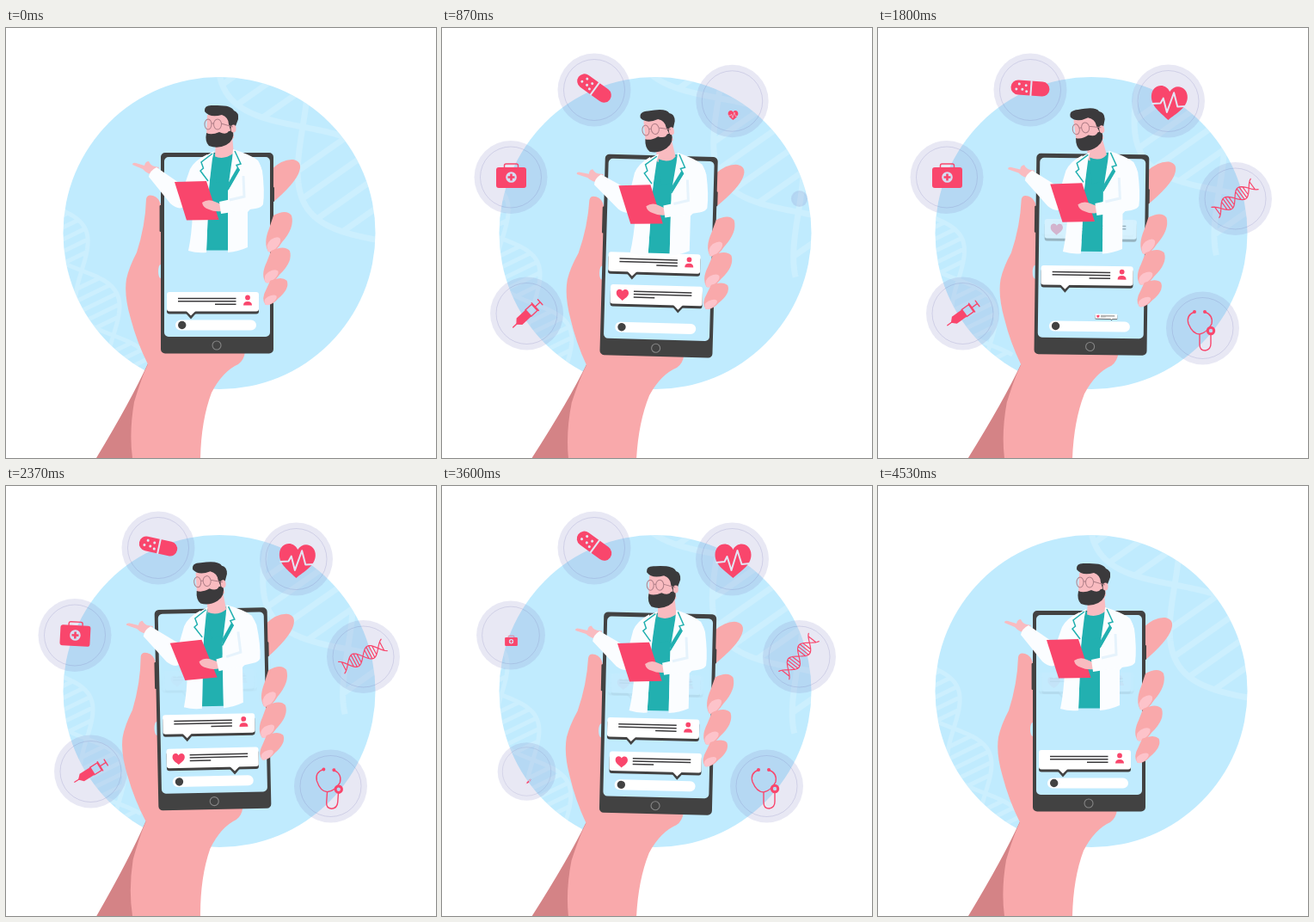
Recreate the animation shown at these times as an HTML page. Size 500 px wide and 500 px high, loop 4.56 s.

```html
<!DOCTYPE html>
<html lang="en">
<head>
<meta charset="utf-8">
<title>Online doctor</title>
<style>
  html, body { margin: 0; width: 100%; height: 100%; overflow: hidden; background: #fff; }
  svg { display: block; width: 100%; height: 100%; }
  .skin { fill: #f9a9ab; } .nail { fill: #fdc3ca; } .face { fill: #f9bbc0; }
  .dark { fill: #424242; } .hair { fill: #3b3a3c; } .pink { fill: #f9466c; }
  .coat { fill: #fbfdff; } .teal { fill: #22b0b0; } .sky { fill: #c0ebfe; }
  .line { fill: none; stroke: #f9466c; stroke-width: 1.4; stroke-linecap: round; }
  .pale { fill: none; stroke: #e3e6f5; stroke-width: 2; }
  .lapel { fill: none; stroke: #22b0b0; stroke-width: 1.5; }
  .helix { fill: none; stroke: #fff; opacity: .18; }
</style>
</head>
<body>
<svg viewBox="0 0 500 500">
  <defs>
    <clipPath id="disc"><circle cx="248" cy="238.5" r="181.5"/></clipPath>
    <path id="heart" d="M0 20C-9 12-21 5-21-7C-21-20-6-24 0-13C6-24 21-20 21-7C21 5 9 12 0 20Z"/>
    <g id="finger">
      <path class="skin" d="M9 4Q24-4 30 4Q34 18 19 35Q11 48 3 46Q-3 36 4 19Z"/>
      <path class="nail" d="M3 46Q-1 38 6 32Q14 27 17 31Q18 36 12 42Q7 48 3 46Z"/>
    </g>
  </defs>

  <circle class="sky" cx="248" cy="238.5" r="181.5"/>
  <g clip-path="url(#disc)">
    <g transform="translate(345 115) rotate(55)"><path class="helix" id="helixR" stroke-width="7"/></g>
    <g transform="translate(88 282) rotate(64)"><path class="helix" id="helixL" stroke-width="5"/></g>
  </g>
  <g id="badges"></g>

  <g id="sway">
    <path fill="#d48386" d="M165 390Q146 432 105 500L100 512H150V500L172 420Z"/>
    <path class="skin" d="M163 199Q164 193 171 195Q178 197 180 206L184 360L278 376Q277 386 270 391Q252 399 239 424Q227 456 226 500V512H148L147 500Q143 470 149 435Q158 405 165 391Q152 365 145 338Q137 311 140 292Q143 278 152 261Q162 230 163 199Z"/>
    <path class="skin" d="M309 164Q322 152 334 153Q345 155 341 167Q337 180 309 204Z"/>
    <ellipse class="sky" cx="180" cy="283" rx="3" ry="8"/>
    <rect class="dark" x="178.6" y="206" width="4" height="31" rx="1"/>
    <rect class="dark" x="309" y="185" width="3" height="17" rx="1"/>
    <rect class="dark" x="180" y="145" width="131" height="233.5" rx="5"/>
    <rect class="sky" x="184" y="150" width="123" height="209" rx="5"/>
    <circle cx="245" cy="369" r="5" fill="none" stroke="#858585" stroke-width="1.1"/>
    <rect x="197" y="339.5" width="94" height="12" rx="6" fill="#fff"/>
    <circle class="dark" cx="204.7" cy="345.5" r="4.7"/>
    <g id="chat"></g>

    <g id="pointing">
      <path class="face" d="M178 162L173 171Q164 170 159 164L147 159Q147 156 151 157L161 160Q162 155 166 155Q168 160 173 161Z"/>
      <path class="coat" d="M234 147Q219 154 214 164L207 184L175 162Q167 166 166 173L191 204Q201 213 209 207L232 188Z"/>
    </g>
    <path class="teal" d="M239 146L264 143L262 175L258 200V258.500H233L236 190Z"/>
    <g id="head">
      <path class="face" d="M244 130L263 126L265 147Q256 155 243 150Z"/>
      <path class="face" d="M234 101L262 99L265 128L240 135L233 124Z"/>
      <path class="hair" d="M233 122Q239 125 248 121Q256 125 259 120L264 119Q266 131 256 136Q246 141 236 137Q231 132 233 122Z"/>
      <path class="hair" d="M231 97Q230 89 241 90Q262 89 265 96Q271 98 270 106L267 114L262 122L259 112Q259 104 251 101Q237 105 231 97Z"/>
      <ellipse class="face" cx="264.500" cy="117" rx="3" ry="4.500"/>
      <path fill="none" stroke="#b07f88" stroke-width="1" d="M250 111L264 115M239 111H242M231 112a4 6 0 0 1 8 0a4 6 0 0 1-8 0M241.500 112a4.500 6 0 0 1 9 0a4.500 6 0 0 1-9 0"/>
    </g>
    <path class="teal" d="M242 149Q253 154 264 146L262 175L245 180Z"/>
    <path class="coat" d="M242 143L226 152Q216 180 217 215Q216 240 212 259Q222 262 233 261L236 185L240 152Z"/>
    <path class="coat" d="M264 141Q284 147 293 154Q300 165 299 195L281 214V255Q270 260 258 261L258 187L263 152Z"/>
    <path class="lapel" d="M240 146L227 156L229.500 163L226 166L235 178M266 143L273 158L268 159.500L271 165L258 188"/>
    <path class="teal" d="M258 189L272 165L269 162L258 181Z"/>
    <g id="holding">
      <path class="pink" d="M196 179L233 178L247.500 223L210 223.500Z"/>
      <path class="face" d="M228 203Q235 198 243 202L250 205L251 213Q242 214 236 211Q229 209 228 203Z"/>
      <path class="coat" d="M283 149Q295 153 298 166Q301 190 299 205Q297 209 290 210L250 216L248 202L276 196L272 180Z"/>
      <path fill="none" stroke="#e6f3fc" stroke-width="3" d="M276 172L277 196L260 200"/>
    </g>
    <use href="#finger" transform="translate(302 214)"/>
    <use href="#finger" transform="translate(299 255.500) scale(1.03 .88)"/>
    <use href="#finger" transform="translate(299 291) scale(.92 .67)"/>
  </g>
</svg>
<script>
const LOOP = 4560;
const $ = id => document.getElementById(id);
const clamp = x => Math.max(0, Math.min(1, x));
const ease = x => (1 - Math.cos(Math.PI * clamp(x))) / 2;
const rotate = (id, a, x, y) => $(id).setAttribute('transform', `rotate(${a} ${x} ${y})`);

function key(t, points) {
  let [t0, v0] = points[0];
  for (const [t1, v1] of points) {
    if (t < t1) return v0 + (v1 - v0) * ease((t - t0) / (t1 - t0));
    [t0, v0] = [t1, v1];
  }
  return v0;
}

// Grows past full size, then settles
function pop(t, peak) {
  if (t <= 0) return 0;
  return t < 190 ? peak * Math.sin(t / 190 * Math.PI / 2) : peak + (1 - peak) * ease((t - 190) / 140);
}

function helix(from, to, amp, half, gaps) {
  const y = x => amp * Math.sin(Math.PI * x / half);
  let a = '', b = '', rungs = '';
  for (let x = from; x <= to; x += 2) {
    a += `${a ? 'L' : 'M'}${x} ${y(x)}`;
    b += `${b ? 'L' : 'M'}${x} ${-y(x)}`;
  }
  for (let k = -3; k < 4; k++) for (const f of gaps) {
    const x = (k + f) * half;
    if (x > from && x < to) rungs += `M${x} ${-y(x)}V${y(x)}`;
  }
  return a + b + rungs;
}
$('helixR').setAttribute('d', helix(-200, 222, 50, 162, [.24, .42, .6, .78]));
$('helixL').setAttribute('d', helix(-80, 190, 25, 84, [.2, .35, .5, .65, .8]));

const art = {
  syringe: `<path class="line" d="M-25 0H-17M-1-5H9V5H-1M9 0H18M10-6V6M18-4V4"/>
    <path class="pink" d="M-20 0L-15-5H0V5H-15Z"/>`,
  kit: `<rect class="pink" x="-17.500" y="-11" width="35" height="24" rx="3"/>
    <path class="line" d="M-8-11V-13Q-8-15-6-15H6Q8-15 8-13V-11"/>
    <circle r="6.300" cy="0.500" fill="#d5def3"/><path class="pink" d="M-1.300-3.500h2.600v2.700h2.700v2.600h-2.700v2.700h-2.600v-2.700h-2.700v-2.600h2.700z"/>`,
  pill: `<rect class="pink" x="-22.500" y="-8.500" width="45" height="17" rx="8.500"/><path class="pale" d="M1-9V9"/>` +
    [[-16, 2], [-13, -4], [-9, 2], [-5, -3], [-4, 4]].map(([x, y]) => `<circle cx="${x}" cy="${y}" r="1.500" fill="#e3e6f5"/>`).join(''),
  heart: `<use href="#heart" class="pink"/><path class="pale" d="M-20 2L-10 1L-7-5L-2 11L5-12L10 4L20 3" stroke-linejoin="round"/>`,
  dna: `<path class="line" style="stroke-width:1.2" d="${helix(-28, 28, 8, 20, [.25, .42, .58, .75])}"/>`,
  scope: `<path class="line" d="M-9-19Q-19-15-16-5Q-11 7-3 7Q6 5 11-5Q13-15 3-19M-3 7V19Q-3 26 3.500 26Q10 25 10 18V8"/>
    <circle class="pink" cx="-9" cy="-19" r="2"/><circle class="pink" cx="3" cy="-19" r="2"/>
    <circle cx="10" cy="3" r="3.700" class="line" style="stroke-width:3"/>`
};

// at: centre, icon: icon centre, base: distance down to the point it grows from
const badges = [
  { name: 'syringe', at: [98.5, 332], icon: [101, 331], base: 15, start: 80, end: 3375,
    turn: [[1100, -43], [1800, -36], [2250, -32], [2900, -32], [3400, -43]] },
  { name: 'kit', at: [80, 173.5], icon: [80.5, 173], base: 13, start: 270, end: 3405,
    turn: [[1800, 0], [2250, 3], [2900, 3], [3300, 0]] },
  { name: 'pill', at: [177, 72], icon: [177, 70], base: 16, start: 430, end: 3620,
    turn: [[950, 36], [1700, 4], [2150, 4], [2800, 36]] },
  { name: 'heart', at: [337.5, 85], icon: [338.5, 87], base: 20, start: 735, end: 3720,
    turn: [[1200, 0], [1750, 3], [2400, 3], [2800, 0]] },
  { name: 'dna', at: [415.5, 198.5], icon: [415, 198], base: 20, start: 846, end: 3850,
    turn: [[1200, -52], [1800, -36], [2250, -28], [2900, -28], [3550, -52]] },
  { name: 'scope', at: [377.5, 349], icon: [377, 349], base: 24, start: 990, end: 3960,
    turn: [[1800, 0], [2250, 4], [2900, 4], [3500, 0]] }
];
$('badges').innerHTML = badges.map(b => `<g>
  <circle r="42.500" fill="rgb(128,128,194)" fill-opacity=".18"/>
  <circle r="35.500" fill="none" stroke="rgb(120,120,180)" stroke-opacity=".28" stroke-width=".8"/></g>
  <g>${art[b.name]}</g>`).join('');
badges.forEach((b, i) => [b.disc, b.sign] = [0, 1].map(k => $('badges').children[2 * i + k]));

const textLines = (x, short) => `<path stroke="#3b3a3c" stroke-width="1.500" d="M${x}-5h67.500m-67.500 3.300h67.500M${short} 1.800h24.500"/>`;
const bubble = (x, tail, content) => `
  <path class="dark" d="M${tail - 7} 11h14l-7 8z"/><rect class="dark" x="${x}" y="-9" width="107" height="22" rx="3"/>
  <path fill="#fff" d="M${tail - 6} 9h12l-6 6z"/><rect fill="#fff" x="${x}" y="-12.500" width="107" height="22.500" rx="3"/>${content}`;
const kinds = [
  { tail: 215, html: bubble(187, 215, textLines(200, 243) +
    `<circle class="pink" cx="281" cy="-6" r="2.900"/><path class="pink" d="M276 3Q276-1.500 281-1.500Q286-1.500 286 3Z"/>`) },
  { tail: 269.5, html: bubble(190.5, 269.5, textLines(217.5, 217.5) +
    `<use href="#heart" class="pink" transform="translate(204.500 -0.500) scale(.34 .33)"/>`) }
];
const moves = [60, 780, 1535, 2385, 3030];
$('chat').innerHTML = [0, 1, 2, 3, 4, 5].map(i => `<g>${kinds[i % 2].html}</g>`).join('');

// Each bubble pops up, moves one place up, then leaves upwards while fading
function drawChat(t) {
  const step = n => n < moves.length ? clamp((t - moves[n]) / 330) : 0;
  [...$('chat').children].forEach((g, i) => {
    const leave = ease(step(i + 1));
    let size = i ? Math.sin(clamp((t - moves[i - 1] - 235) / 200) * Math.PI / 2) : 1;
    let y = 319.5 - 39.5 * step(i) - 51 * leave;
    if (i === 4) y += 39.5 * ease((t - 4000) / 330);
    if (i === 5) size *= 1 - ease((t - 3850) / 200);
    const { tail } = kinds[i % 2];
    g.setAttribute('transform', `translate(${tail} ${y + 19}) scale(${size}) translate(${-tail} -19)`);
    g.setAttribute('opacity', 1 - .985 * leave ** 4);
  });
}

function drawBadge(b, t) {
  const size = delay => t < b.end - 300 ? pop(t - b.start - delay, 1.1) : pop(b.end - delay * .8 + 330 - t, 1.05);
  const [x, y] = b.icon;
  b.disc.setAttribute('transform', `translate(${b.at}) scale(${size(0)})`);
  b.sign.setAttribute('transform',
    `translate(${x} ${y + b.base}) scale(${size(105)}) translate(0 ${-b.base}) rotate(${key(t, b.turn)})`);
}

function draw(now) {
  const t = now % LOOP;
  rotate('sway', key(t, [[0, 0], [1340, 2.2], [2340, -1.2], [3350, 1.5], [LOOP, 0]]), 128, 500);
  rotate('head', key(t, [[0, 0], [1300, -13], [3000, -1], [3600, -2], [LOOP, 0]]), 255, 165);
  rotate('pointing', key(t, [[0, 0], [1000, -7.5], [2200, -2], [3500, -6], [LOOP, 0]]), 230, 160);
  rotate('holding', key(t, [[0, 0], [900, -1.5], [1800, -1], [2700, -4.5], [3600, -1.5], [LOOP, 0]]), 283, 160);
  const drift = key(t, [[0, 0], [1600, -72], [2900, -70], [LOOP, 0]]);
  for (const id of ['helixR', 'helixL']) $(id).setAttribute('transform', `translate(${drift} 0)`);
  badges.forEach(b => drawBadge(b, t));
  drawChat(t);
}

const origin = performance.now();
function tick() {
  draw(performance.now() - origin);
  requestAnimationFrame(tick);
}
tick();
</script>
</body>
</html>
```
